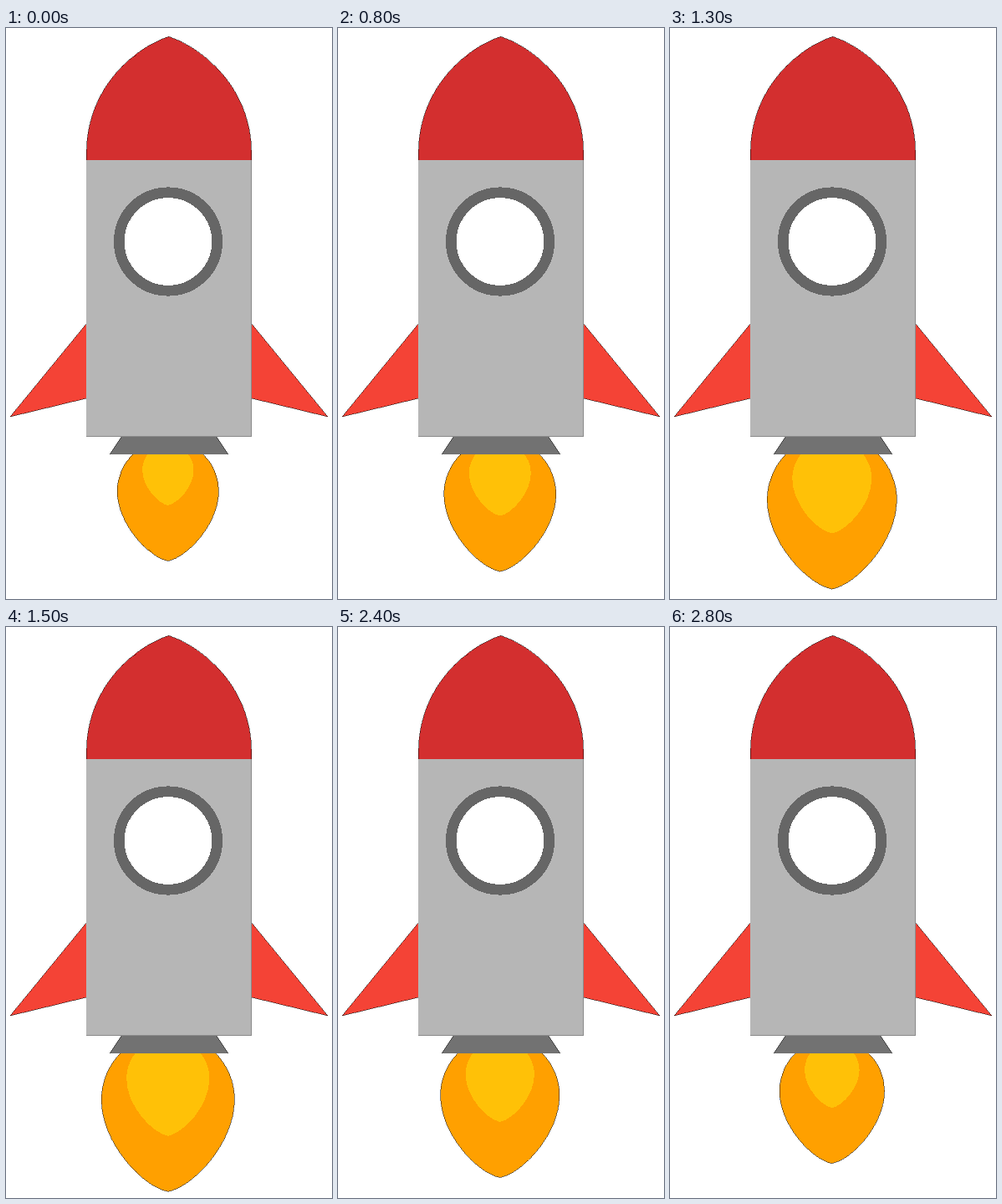
Write an HTML page that moves like this. It is 390x683 px and loops after 3 s.

```html
<!DOCTYPE html>
<html lang="en">
<head>
<meta charset="utf-8">
<title>Rocket</title>
<style>
  html, body { margin: 0; width: 100%; height: 100%; overflow: hidden; background: #fff; }
  svg { display: block; width: 390px; height: 683px; shape-rendering: crispEdges; }
  .edge { stroke: #000; stroke-width: .5; }
</style>
</head>
<body>
<svg viewBox="0 0 390 683">
  <path id="outer" class="edge" fill="#ffa000"/>
  <path id="inner" fill="#ffc107"/>
  <path fill="#727272" d="M138 489H252L266 510H124Z"/>
  <path class="edge" d="M138 489L124 510M252 489L266 510"/>
  <path class="edge" fill="#f44336" d="M96 354L5 465L96 443M294 354L385 465L294 443"/>
  <path class="edge" fill="#d32f2f" d="M96.3 158V150C96.3 68 158 22 194.7 10.3C231 22 293.7 68 293.7 150V158"/>
  <path fill="#b6b6b6" d="M96 157.6H294V489H96Z"/>
  <path fill="none" stroke="#8a8a8a" d="M293.5 158V488.5H96"/>
  <circle cx="194" cy="255.5" r="58.7" fill="#fff" stroke="#666" stroke-width="12.8"/>
</svg>
<script>
  const LOOP = 3000, CX = 193.8;
  // Times at which the flame moves one size up, then one size down
  const grow = [500, 700, 800, 900, 1000, 1100, 1200, 1300, 1500];
  const shrink = [2000, 2200, 2300, 2400, 2500, 2600, 2700, 2800];
  const outer = document.getElementById('outer');
  const inner = document.getElementById('inner');

  const passed = (times, t) => times.filter(x => t >= x).length;

  // Round on top, tapering to a blunt point at the bottom
  function drop(r, tip) {
    const y = tip - 1.38 * r;
    const p = (u, v) => `${CX + u * r} ${y + v * r} `;
    return `M${p(-1, 0)}A${r} ${r} 0 0 1 ${p(1, 0)}` +
      `C${p(1, .65)}${p(.38, 1.31)}${p(0, 1.38)}` +
      `C${p(-.38, 1.31)}${p(-1, .65)}${p(-1, 0)}Z`;
  }

  function draw(now) {
    const t = now % LOOP;
    const size = passed(grow, t) - passed(shrink, t);
    outer.setAttribute('d', drop(60.7 + 2.1 * size, 637.5 + 4.2 * size));
    inner.setAttribute('d', drop(30.7 + 2.1 * size, 571 + 4.2 * size));
    requestAnimationFrame(draw);
  }
  draw(0);
</script>
</body>
</html>
```
